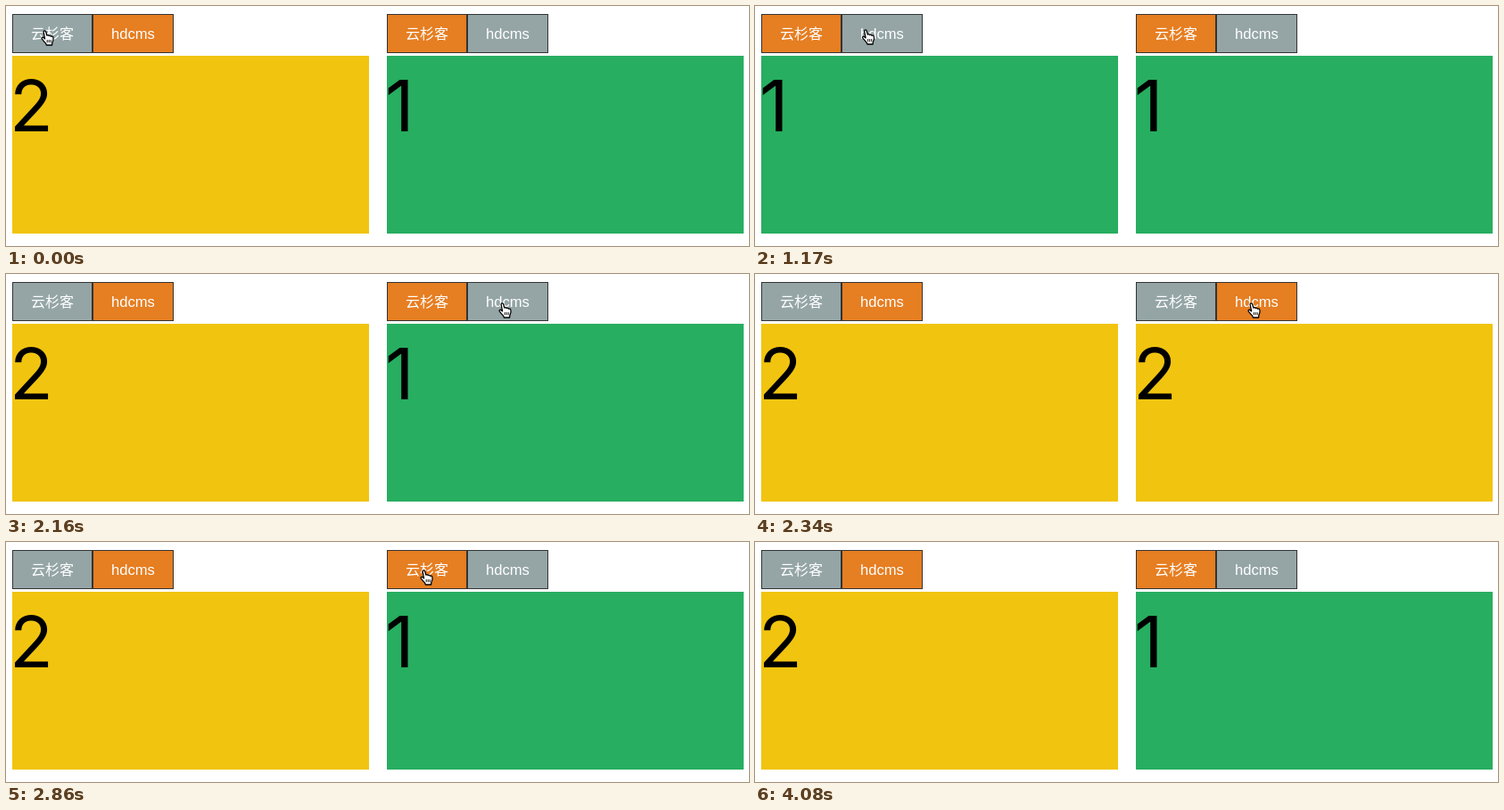
These frames come from a looping animation (833 px wide and 270 px high, 4980 ms). An HTML page with a canvas:

```html
<!DOCTYPE html>
<html lang="zh">
<head>
<meta charset="utf-8">
<title>Tabs</title>
<style>
html, body { margin: 0; width: 833px; height: 270px; overflow: hidden; background: #fff; }
canvas { display: block; }
</style>
</head>
<body>
<canvas id="stage" width="833" height="270"></canvas>
<script>
const ctx = document.getElementById('stage').getContext('2d');
const LOOP = 4980;
const GREY = '#95a5a6', ORANGE = '#e67e22', YELLOW = '#f1c40f', GREEN = '#27ae60';
const LABEL_FONT = '16.6px "Liberation Sans", Arial, sans-serif';
const CJK_FONT = '16px "Noto Sans CJK SC", "Noto Sans CJK", sans-serif';
const DIGIT_FONT = '80px Inter, Roboto, sans-serif';
const TABS = [
  { x: 7, w: 90, text: '云杉客', font: CJK_FONT },
  { x: 97, w: 91, text: 'hdcms', font: LABEL_FONT }
];

// Pointer moves: start, end, number of steps, from, to; "rest" keeps the first step still.
const MOVES = [
  { t0: 950, t1: 1170, n: 5, from: [43, 28], to: [123.5, 27] },
  { t0: 1410, t1: 1700, n: 6, from: [123.5, 27], to: [513, 38], rest: true },
  { t0: 1930, t1: 2160, n: 5, from: [513, 38], to: [556, 33] },
  { t0: 2340, t1: 2620, n: 6, from: [556, 33], to: [481, 32], rest: true },
  { t0: 2860, t1: 3380, n: 10, from: [468, 32], to: [155, 28], rest: true },
  { t0: 3620, t1: 4022, n: 8, from: [155, 28], to: [692, 262] }
];

const HAND = new Path2D('M3.1 2.3C3.1.5 5.3.4 5.7 2L6.8 6.1C7.4 5.2 8.9 5.4 9.2 6.6' +
  'C9.9 5.9 11.2 6.2 11.5 7.3C12.4 6.7 13.6 7.2 13.9 8.4C14.5 10.4 13.7 13 12.8 14.6' +
  'L12.6 17H6.4L5.7 15.2L3.2 12.3L1.2 9.9C.6 8.7 2 7.8 3 8.5L4.6 9.9Z');
const HAND_LINES = new Path2D('M7.2 11V14.2M9.2 11V14.2M11.2 11V14.2');
const ARROW = new Path2D('M0 0V14.5L3.3 11.4L5.4 16.5L7.8 15.5L5.7 10.6H10.4Z');

const ease = p => p * p * (3 - 2 * p);

function pointerAt(t) {
  if (t >= 4080) return null;
  let pos = MOVES[0].from;
  for (const m of MOVES) {
    if (t < m.t0) break;
    const step = Math.min(m.n - 1, Math.floor((t - m.t0) * (m.n - 1) / (m.t1 - m.t0) + 0.001));
    const p = ease(m.rest ? step / (m.n - 1) : (step + 1) / m.n);
    pos = m.from.map((v, i) => v + (m.to[i] - v) * p);
  }
  return pos;
}

function drawTab(tab, left, active) {
  const x = left + tab.x;
  ctx.fillStyle = '#333';
  ctx.fillRect(x, 9, tab.w, 44);
  ctx.fillStyle = active ? ORANGE : GREY;
  ctx.fillRect(x + 1, 10, tab.w - 2, 42);
  ctx.fillStyle = '#fff';
  ctx.font = tab.font;
  ctx.fillText(tab.text, x + 21, 37);
}

function drawGroup(left, active) {
  TABS.forEach((tab, i) => drawTab(tab, left, i === active));
  ctx.fillStyle = active ? YELLOW : GREEN;
  ctx.fillRect(left + 7, 56, 400, 200);
  ctx.fillStyle = '#000';
  ctx.font = DIGIT_FONT;
  const digit = String(active + 1);
  const ink = ctx.measureText(digit).actualBoundingBoxLeft;
  ctx.fillText(digit, left + (active ? 10 : 8) + ink, 141);
}

function overTab([x, y]) {
  return y >= 9 && y < 53 && [0, 420].some(left => x >= left + 7 && x < left + 188);
}

function drawPointer(pos) {
  ctx.save();
  ctx.lineJoin = 'round';
  if (overTab(pos)) {
    ctx.translate(pos[0] - 4, pos[1] - 1);
    ctx.fillStyle = '#fff';
    ctx.strokeStyle = '#000';
    ctx.lineWidth = 1.3;
    ctx.fill(HAND);
    ctx.stroke(HAND);
    ctx.lineWidth = 0.9;
    ctx.stroke(HAND_LINES);
  } else {
    ctx.translate(pos[0], pos[1]);
    ctx.strokeStyle = '#fff';
    ctx.lineWidth = 2;
    ctx.stroke(ARROW);
    ctx.fillStyle = '#000';
    ctx.fill(ARROW);
  }
  ctx.restore();
}

function draw(t) {
  ctx.fillStyle = '#fff';
  ctx.fillRect(0, 0, 833, 270);
  drawGroup(0, t >= 770 && t < 1410 ? 0 : 1);
  drawGroup(420, t >= 2340 && t < 2860 ? 1 : 0);
  const pos = pointerAt(t);
  if (pos) drawPointer(pos);
}

const start = performance.now();
function frame() {
  draw((performance.now() - start) % LOOP);
  requestAnimationFrame(frame);
}
frame();
</script>
</body>
</html>
```
